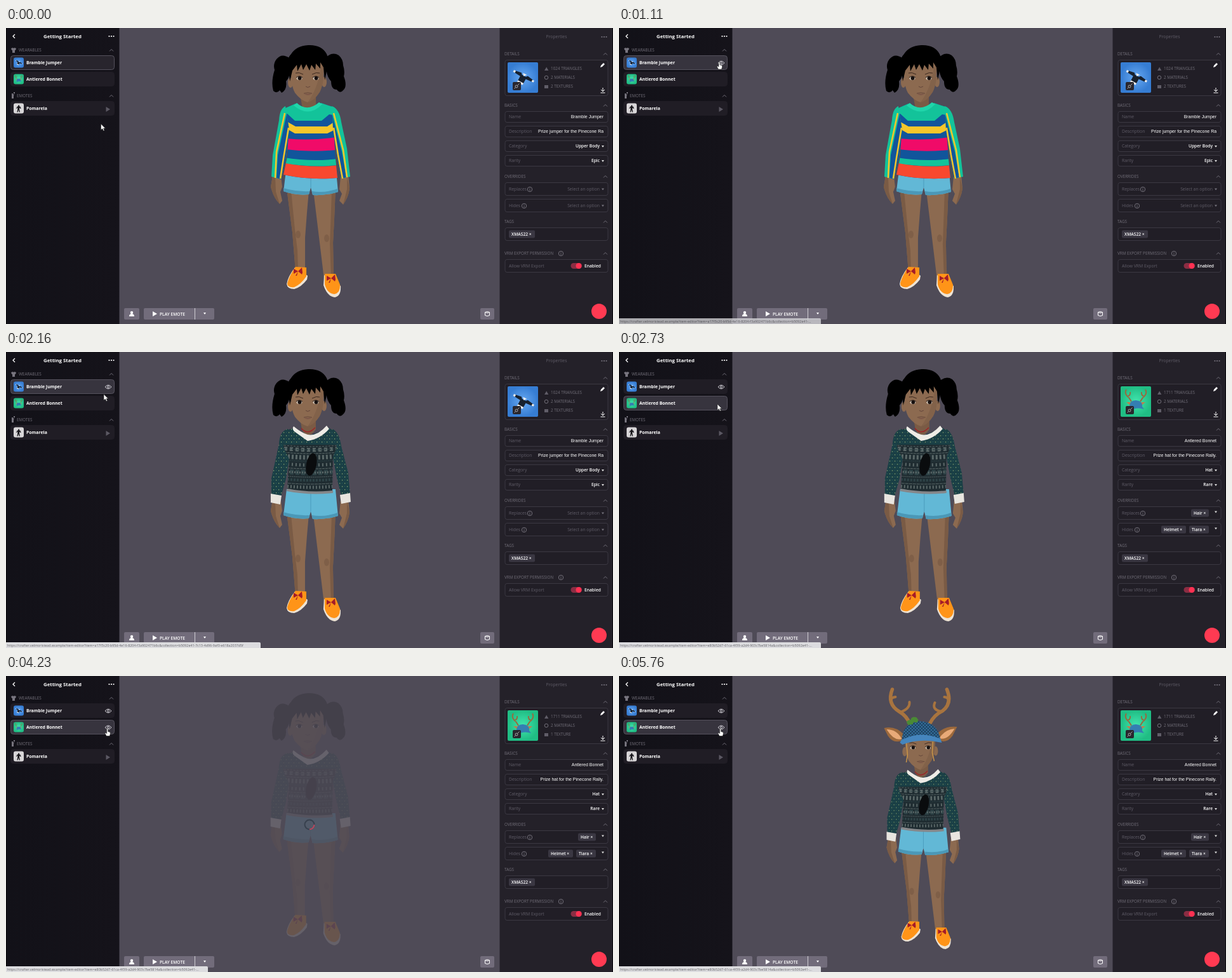
An HTML page that plays this animation: 956x466 px, repeating every 5.97 s.

```html
<!DOCTYPE html>
<html lang="en">
<head>
<meta charset="utf-8">
<title>Wearable editor</title>
<style>
html, body { margin: 0; width: 100%; height: 100%; overflow: hidden; background: #131119; }
svg { display: block; width: 956px; height: 466px; }
text { font: 6.8px "Open Sans", "Noto Sans", sans-serif; fill: #605d68; }
.bold { font-weight: 700; fill: #fff; font-size: 6.9px; }
.title { font-weight: 700; fill: #fff; font-size: 7.8px; }
.cap { font-size: 6.35px; fill: #716e78; }
.val { font: 7px "Liberation Sans", Arial, sans-serif; fill: #fff; }
.semi { font-weight: 600; fill: #fff; font-size: 6.7px; }
.url { font-size: 5.35px; fill: #65656a; }
.end { text-anchor: end; }
.mid { text-anchor: middle; }
.box { fill: #211e26; stroke: #3b3842; }
.chip { fill: #3a3742; }
.row { fill: #201d25; stroke: #201d25; }
.row.picked { fill: #28252d; stroke: #55525d; }
.row.lit { fill: #37343e; }
.line { fill: none; stroke: #716e78; stroke-width: 1; }
.skin { fill: #8c6a50; }
.shade { fill: #7a5b45; }
</style>
</head>
<body>
<svg viewBox="0 0 956 466">
  <defs>
    <linearGradient id="side" x2="1"><stop stop-color="#121118"/><stop offset="1" stop-color="#15131a"/></linearGradient>
    <radialGradient id="blue"><stop stop-color="#68a9f2"/><stop offset="1" stop-color="#367dd3"/></radialGradient>
    <radialGradient id="green"><stop stop-color="#42e5ae"/><stop offset="1" stop-color="#20bd84"/></radialGradient>
    <pattern id="dots" width="8" height="10" patternUnits="userSpaceOnUse">
      <path d="M0 0H8V10H0Z" fill="#1a3f45"/>
      <path d="M1 1h1.300v1.600h-1.300zM5 6h1.300v1.600h-1.300z" fill="#809c6c"/>
      <path d="M5 1h1v1h-1zM1 6h1v1h-1z" fill="#2f6566"/>
    </pattern>
    <pattern id="mesh" width="5" height="5" patternUnits="userSpaceOnUse">
      <path d="M0 0H5V5H0Z" fill="#3a7fae"/>
      <path d="M0 0L5 5M5 0L0 5" stroke="#1d3e5e" stroke-width="1.3"/>
    </pattern>
    <clipPath id="torso"><path d="M456 119Q474 142 496 118L517 125L522 148L516 162L519 206L522 236Q480 240 437 231L443 202L445 166L437 150L438 127Z"/></clipPath>
    <clipPath id="knit"><path d="M453 120Q474 142 506 118L519 126L521 150L515 166L514 219Q478 223 443 216L446 168L437 150L439 124Z"/></clipPath>
    <clipPath id="field"><path d="M836 154H941V173H836Z"/></clipPath>
  </defs>

  <path d="M0 0H956V466H0Z" fill="#4f4b57"/>
  <circle cx="478" cy="234" r="7.5" fill="none" stroke="#2c2933" stroke-width="2" class="load"/>
  <path d="M485.500 234A7.500 7.500 0 0 1 478 241.500" fill="none" stroke="#e2384f" stroke-width="2" class="load" id="arc"/>

  <g id="avatar">
    <g id="body">
      <!-- legs and shoes -->
      <path class="skin" d="M442 252L477 256L474 290L471 330L471 382L456 384L451 322ZM484 256L519 252L517 300L515 338L516 394L501 396L493 330Z"/>
      <path class="shade" d="M442 252L449 256L455 318L459 350L460 383L456 384L451 322ZM513 256L519 252L517 300L515 338L516 394L512 394L510 340Z"/>
      <g class="shade" opacity=".7"><ellipse cx="460" cy="325" rx="4" ry="6"/><ellipse cx="505" cy="331" rx="4" ry="6"/></g>
      <path d="M455 377Q444 391 442 403Q443 411 454 411Q465 408 474 396L475 390Z" fill="#eee4d5"/>
      <path d="M456 376L473 377L473 391Q464 404 454 408Q443 409 443 402Q446 390 456 376Z" fill="#ff9418"/>
      <path d="M501 389L500 405Q506 423 518 424Q528 422 527 406Z" fill="#eee4d5"/>
      <path d="M502 387L519 387L526 404Q527 417 517 419Q506 418 502 404Z" fill="#ff9418"/>
      <path id="bow" d="M460 383l-7 -4 0 8zl6 -6 1 8zl-4 7 2 0zl6 5 1 -3z" fill="#a51c28"/>
      <use href="#bow" x="52" y="11"/>
      <!-- hands, shorts -->
      <path class="skin" d="M420 232L417 250Q421 267 431 277L435 272L432 258L435 250L433 234ZM527 234L525 254L529 261L525 272L531 278Q540 265 541 252L539 232Z"/>
      <path class="shade" d="M420 234L417 250Q421 267 431 277L425 258L424 236ZM537 234L541 252Q540 265 531 278L537 254Z"/>
      <path d="M442 216L519 216L523 258Q505 264 483 263L480 251L477 262Q456 264 437 257Z" fill="#62b8d6"/>
      <path d="M437 252L437 257Q456 264 477 262L478 257Q457 258 437 252ZM482 257L483 263Q505 264 523 258L522 253Q503 260 482 257Z" fill="#4b98b7"/>
      <path d="M480 222V251" stroke="#4b9cbd" fill="none"/>
      <!-- head -->
      <path class="shade" d="M463 104L466 122Q475 140 488 122L488 102Z"/>
      <ellipse class="skin" cx="448" cy="86" rx="4" ry="8"/><ellipse class="skin" cx="501" cy="85" rx="4" ry="8"/>
      <path class="skin" d="M449 50H500Q502 86 494 101Q485 115 475 117Q464 114 455 102Q447 88 449 50Z"/>
      <path class="shade" d="M500 58Q502 86 494 101Q485 115 475 117Q491 96 496 62Z" opacity=".5"/>
      <g id="eye"><ellipse cx="462" cy="79" rx="4.500" ry="3" fill="#d9cbbb"/><circle cx="462.500" cy="79" r="3" fill="#17100f"/><path d="M457 78Q462 74 467 78" stroke="#17100f" fill="none"/></g>
      <use href="#eye" x="26"/>
      <path d="M456 71Q461 69 468 73M482 73Q489 69 494 71" stroke="#3a271e" fill="none"/>
      <path d="M472 92Q475 95 479 92M469 103Q475 101 482 103" stroke="#63453a" fill="none"/>
      <path d="M470 104Q475 107 481 104Z" fill="#775146"/>
      <g id="hair">
        <path d="M446 47Q434 39 426 49Q420 57 423 66Q417 85 421 99Q427 104 431 98L434 102Q443 97 441 84Q449 76 447 56ZM504 46Q514 37 524 43Q531 49 531 59Q534 68 532 76Q538 92 531 98Q526 104 521 97Q512 97 512 84Q504 76 504 58Z"/>
        <path d="M447 84L445 66Q440 50 449 41Q457 28 476 27Q497 26 505 41Q511 53 505 68L502 82L500 62L495 54V64L488 56L487 66L481 58L478 67L473 57L468 66L465 57L459 68L458 58L451 67Z"/>
      </g>
      <!-- striped top -->
      <g id="stripes">
        <g clip-path="url(#torso)">
          <path d="M430 110H530V240H430Z" fill="#11559b"/>
          <path d="M430 110H530V139L509 136L497 146H455L443 135L430 140Z" fill="#13c39a"/>
          <path d="M440 146L456 155H506L518 147V160L506 166H455L441 158Z" fill="#f6c62a"/>
          <path d="M442 174Q480 178 520 172V192Q480 196 440 191Z" fill="#f00b68"/>
          <path d="M438 204Q480 211 522 206V216Q480 220 437 213Z" fill="#13c39a"/>
          <path d="M434 212Q480 221 525 216V240H434Z" fill="#f8482f"/>
        </g>
        <path d="M440 123Q431 127 430 145L420 200L418 234L433 238L441 203L446 160Z" fill="#13c39a"/>
        <path d="M442 135L428 200L426 236L433 238L441 203L446 160Z" fill="#11559b"/>
        <path d="M439 134L426 195L424 236M445 157L437 205L432 237" stroke="#f6c62a" stroke-width="2.500" fill="none"/>
        <path d="M513 123Q525 127 528 148L537 190L542 234L528 237L521 200L515 158Z" fill="#13c39a"/>
        <path d="M514 137L529 195L536 235L528 237L521 200L515 158Z" fill="#11559b"/>
        <path d="M516 134L531 192L537 235M516 157L523 200L530 237" stroke="#f6c62a" stroke-width="2.500" fill="none"/>
        <path d="M458 118Q474 133 493 117L498 120Q477 142 453 122Z" fill="#20d5aa"/>
      </g>
      <!-- patterned jumper -->
      <g id="jumper">
        <path d="M444 121Q431 124 430 145L418 199L418 225L433 228L441 200L447 163ZM514 121Q525 126 528 148L539 190L542 224L528 226L521 198L514 161Z" fill="url(#dots)"/>
        <path d="M417 223L434 226L432 240L417 237ZM526 225L542 222L543 236L528 239Z" fill="#e8e5df"/>
        <g clip-path="url(#knit)">
          <path d="M430 110H530V230H430Z" fill="#1f2c31"/>
          <path d="M430 110H530V146H430Z" fill="url(#dots)"/>
          <g id="bands" fill="none"></g>
        </g>
        <ellipse cx="481" cy="177" rx="8" ry="18" transform="rotate(12 481 177)" fill="#0a0c0e"/>
        <path d="M443 215Q478 222 515 218L515 222Q478 226 442 219Z" fill="#85878a"/>
        <path d="M453 117Q450 121 454 125L475 140Q495 137 509 121L505 116Q490 133 475 130Q465 127 453 117Z" fill="#eeece6"/>
        <path d="M465 120Q475 132 487 119" stroke="#9d2428" stroke-width="1.500" fill="none"/>
      </g>
    </g>
    <g id="helmet">
      <g fill="none" stroke="#a8743f" stroke-linecap="round">
        <path d="M459 76Q454 63 442 56Q422 44 431 21" stroke-width="5.500"/>
        <path d="M443 57Q459 52 458 41M430 43Q426 34 436 33" stroke-width="4"/>
        <path d="M490 75Q497 61 510 55Q526 43 517 21" stroke-width="5.500"/>
        <path d="M508 56Q493 53 498 42M518 43Q522 34 513 33" stroke-width="4"/>
      </g>
      <path d="M448 101Q433 108 424 94L418 82Q436 78 449 92ZM502 100Q516 108 526 94L533 80Q513 78 502 91Z" fill="#9c693c"/>
      <path d="M446 99Q434 103 422 84Q438 84 446 99ZM505 98Q518 102 529 83Q514 84 505 98Z" fill="#e8aa78"/>
      <path d="M453 103L455 124L453 136M495 103L494 121L497 134" stroke="#c99549" stroke-width="1.500" fill="none"/>
      <path d="M446 101Q447 74 473 71Q503 72 507 101Z" fill="url(#mesh)"/>
      <path d="M445 101Q475 85 507 99L509 105Q475 97 447 108L443 105Z" fill="#4585bd"/>
      <path d="M456 77Q450 70 460 69Q461 63 469 65L472 69Q470 76 465 72L463 76Z" fill="#4a8a35"/>
    </g>
  </g>

  <path d="M0 0H178.500V466H0Z" fill="url(#side)"/>
  <path d="M777.500 0H955V466H777.500Z" fill="#242129"/>
  <path d="M0 0H1V466H0ZM955 0H956V466H955Z" fill="#08070a"/>
  <g id="ui"></g>

  <g id="status">
    <path id="bar" fill="#dcdcdf"/>
    <text id="link" class="url" x="2" y="464.300"></text>
  </g>
  <path id="arrow" d="M0 0V9.500L2.300 7.500L4 11L5.600 10.200L4 7H7Z" fill="#fff" stroke="#222" stroke-width=".6"/>
  <path id="hand" d="M-1 1Q0 -.5 1 1V5L4.500 6V9L3.500 12H-1.500L-4 7.500L-2.500 7L-1 8Z" fill="#fff" stroke="#222" stroke-width=".6"/>
</svg>
<script>
const LOOP = 5970, STEP = 30;
const $ = id => document.getElementById(id);
const text = (x, y, s, c = '') => `<text x="${x}" y="${y}" class="${c}">${s}</text>`;
const rect = (x, y, w, h, r, a) => `<rect x="${x}" y="${y}" width="${w}" height="${h}" rx="${r}" ${a}/>`;
const path = (d, a) => `<path d="${d}" ${a}/>`;
const fill = c => `fill="${c}"`;
const line = 'class="line"';
const up = (x, y) => path(`M${x - 3} ${y + 1.5}l3 -3 3 3`, line);
const down = (x, y, c = '#ddd') => path(`M${x - 2} ${y - 1}h4l-2 3z`, fill(c));
const more = (x, y, c) => [-3.5, 0, 3.5].map(d => `<circle cx="${x + d}" cy="${y}" r="1.1" ${fill(c)}/>`).join('');
const info = (x, y) => `<circle cx="${x}" cy="${y}" r="3.7" ${line}/>` + path(`M${x} ${y - 2}v1m0 .8v2.400`, line);
const chip = (x, y, w, s) => rect(x, y, w, 12, 2, 'class="chip"') + text(x + 4, y + 8.4, s + ' ×', 'semi');
const eye = (id, y) => `<g id="${id}" fill="none" stroke="#cbc9d0">${path(`M156 ${y}q5 -6 10 0q-5 6 -10 0z`, '')}<circle cx="161" cy="${y}" r="1.6"/></g>`;

// Tiny item pictures, drawn in a 48 unit square
const shirtArt = `<g transform="rotate(28 24 24) translate(4.500 3.500) scale(.82)">${path('M5 20L17 18L20 21H28L31 18L43 20V24L30 25V36H18V25L5 24Z', fill('#17202d'))}${path('M2 20h4v4h-4zM42 20h4v4h-4zM18 34h12v4h-12zM20 17l4 5 4 -5z', fill('#eee'))}</g>`;
const hatArt = path('M17 24Q14 18 10 15Q6 10 9 5M11 16Q16 14 15 9M31 24Q34 18 38 15Q42 10 39 5M37 16Q32 14 33 9', 'fill="none" stroke="#98693f" stroke-width="2"') +
  path('M9 25L16 25 15 30ZM39 25L32 25 33 30Z', fill('#bd804c')) + path('M14 32Q14 22 24 22Q35 23 34 32L37 36Q26 32 14 38Z', fill('#347eb2'));
const poseArt = path('M22 9h5v6h4l4 9 -3 2 -4 -6 -1 8 3 14h-4l-3 -11 -3 11h-4l3 -15 -1 -8 -4 7 -2 -2 5 -9h4z', fill('#17151a'));
const art = (x, y, size, bg, a) => `<g transform="translate(${x} ${y}) scale(${size / 48})">${rect(0, 0, 48, 48, size > 20 ? 2 : 9, fill(bg))}${a}</g>`;

const row = (id, y, name, bg, a) => rect(7.5, y + .5, 163, 22, 4, `id="${id}" class="row"`) + art(12, y + 3.5, 16, bg, a) + text(32, y + 13.8, name, 'bold');

const head = (y, s) => text(785, y + 2.2, s, 'cap') + up(944, y);
const field = (y, h, s) => rect(786, y + .5, 162, h - 1, 3, 'class="box"') + text(792, y + h / 2 + 2.4, s);

const left = path('M14 10l-3 3 3 3', 'fill="none" stroke="#fff" stroke-width="1.3"') +
  text(89, 15.8, 'Getting Started', 'title mid') + more(166, 13, '#fff') +
  path('M8 32l3 -1q1 2 2 0l3 1 -1 3h-1v4h-4v-4h-1z', fill('#77747e')) + text(20, 37.3, 'WEARABLES', 'cap') + up(166, 35) +
  row('row1', 43, 'Bramble Jumper', 'url(#blue)', shirtArt) + row('row2', 69, 'Antlered Bonnet', 'url(#green)', hatArt) +
  path('M9 103h2v2l2 -2 -1 4v4h-3zM12 101h2v2h-2z', fill('#77747e')) + text(17, 108.7, 'EMOTES', 'cap') + up(166, 107) +
  row('row3', 115, 'Pomarela', '#d8d6d8', poseArt) + path('M157.5 124V132L164 128Z', fill('#5b5863')) + eye('eye1', 55) + eye('eye2', 81);

const right = text(867, 16.4, 'Properties', 'mid') + more(942, 14, '#77747e') +
  head(41, 'DETAILS') + rect(786, 50.5, 162, 56, 3, 'class="box"') +
  path('M848 67l3.200 -5.500 3.200 5.500zM848 90h6v5h-6z', fill('#605d68')) + `<circle cx="851" cy="78" r="2.800" ${line}/>` +
  path('M936 62l1 -3 4 -4 2 2 -4 4z', fill('#fff')) + path('M940 94v6m-3 -3l3 3 3 -3M936.500 102h7', 'fill="none" stroke="#fff"') +
  head(122, 'BASICS') + field(131, 18, 'Name') + field(154, 18, 'Description') + field(177, 18, 'Category') + field(200, 18, 'Rarity') +
  down(940, 186) + down(940, 209) +
  head(234, 'OVERRIDES') + field(243, 21, 'Replaces') + info(825, 254) + field(269, 21, 'Hides') + info(816, 280) +
  head(305, 'TAGS') + field(314, 21, '') + chip(792, 318.5, 41, 'XMAS22') +
  head(355, 'VRM EXPORT PERMISSION') + info(874, 355) + field(364, 21, 'Allow VRM Export') +
  rect(889.5, 370, 17.500, 9, 4.5, fill('#8b2d43')) + `<circle cx="902" cy="374.500" r="4.500" ${fill('#ff3152')}/>` + text(911, 377, 'Enabled', 'semi');

const badge = rect(798, 85, 13, 13, 2, fill('#29262d')) + '<circle cx="804" cy="92" r="2" fill="none" stroke="#aaa"/>' + path('M805.500 90.500l3 -3M802.500 93.500l-2 2', 'stroke="#aaa"');
const stats = list => list.map((s, i) => text(858, 66.3 + 14 * i, s, 'cap')).join('');
const props = (id, pic, counts, name, about, cat, rarity, extra) => `<g id="${id}">${pic}${badge}${stats(counts)}` +
  text(941, 142.4, name, 'val end') + about + text(935, 188.4, cat, 'semi end') + text(935, 211.4, rarity, 'semi end') + extra + '</g>';

const select = y => text(935, y + 2.4, 'Select an option', 'end') + down(940, y, '#77747e');
const first = props('props1', art(790, 54, 48, 'url(#blue)', shirtArt), ['1024 TRIANGLES', '2 MATERIALS', '2 TEXTURES'], 'Bramble Jumper',
  `<g clip-path="url(#field)">${text(838, 165.4, 'Prize jumper for the Pinecone Rally.', 'val')}</g>`, 'Upper Body', 'Epic', select(253.5) + select(279.5));
const second = props('props2', art(790, 54, 48, 'url(#green)', hatArt), ['1711 TRIANGLES', '2 MATERIALS', '1 TEXTURE'], 'Antlered Bonnet',
  text(941, 165.4, 'Prize hat for the Pinecone Rally.', 'val end'), 'Hat', 'Rare',
  chip(901, 247.5, 28, 'Hair') + down(940, 251.5) + chip(854, 273.5, 39, 'Helmet') + chip(898, 273.5, 31, 'Tiara') + down(940, 277.5));

const key = fill('#726c7b');
const bottom = rect(186, 441, 24, 18, 2, key) + rect(217, 441, 111, 18, 2, key) + rect(747, 441, 22, 18, 2, key) +
  path('M297.500 441v18', 'stroke="#d0cdd4"') + path('M231 446v8l7 -4z', fill('#fff')) + text(242, 452.7, 'PLAY EMOTE', 'semi') + down(313, 449, '#fff') +
  '<circle cx="198" cy="448" r="2.200" fill="#fff"/>' + path('M194 454q0 -4 4 -4t4 4z', fill('#fff')) +
  path('M754.500 447.500q3.500 -2 7 0v5q-3.500 2 -7 0zq3.500 2 7 0', 'fill="none" stroke="#fff"') +
  `<circle cx="934" cy="446" r="12" ${fill('#ff3a52')}/>`;

$('ui').innerHTML = left + right + first + second + bottom;

// Knitted rows: height, thickness, dash, gap
$('bands').innerHTML = [[147, 1, 3, 2], [152, 6, 5, 4], [152, 2, 2, 2], [158, 1, 4, 1], [164, 7, 3, 3], [170, 1, 2, 1], [176, 5, 2, 4], [182, 1, 4, 1], [188, 8, 6, 3], [188, 3, 2, 2], [195, 1, 2, 1], [200, 4, 3, 2], [206, 1, 5, 1], [211, 5, 2, 3]]
  .map(([y, w, on, off], i) => path(`M438 ${y}Q480 ${y + 4} 522 ${y}`, `stroke="${i % 3 == 2 ? '#2e4347' : '#5b6868'}" stroke-width="${w}" stroke-dasharray="${on} ${off}"`)).join('');

const site = 'https://crafter.velmoristead.example/item-editor?item=';
const links = [
  site + 'a17f3c20-b95d-4e16-8204-f3a902471b6c&amp;collection=b5092e41-...',
  site + 'a17f3c20-b95d-4e16-8204-f3a902471b6c&amp;collection=b5092e41-7c13-4d96-9af0-e618a2037d5f',
  site + 'e80b52d7-61ca-4f39-a2d4-903c7be5814a&amp;collection=b5092e41-...'
];

const show = (el, on) => { el.style.display = on ? '' : 'none'; };
const ramp = (t, a, b) => Math.min(1, Math.max(0, (t - a) / (b - a)));
const ease = u => u * u * (3 - 2 * u);

// Pointer stops: time, x, y
const stops = [[0, 149.5, 151], [300, 149.5, 151], [990, 158, 53], [1560, 158, 53], [2160, 154, 66.5], [2520, 155, 82], [3000, 155, 82], [3420, 159.7, 82.5], [LOOP, 159.7, 82.5]];
function pointer(t) {
  const i = stops.findIndex(s => s[0] > t);
  const [t0, x0, y0] = stops[i - 1], [t1, x1, y1] = stops[i];
  const u = ease(ramp(t, t0, t1));
  return [x0 + (x1 - x0) * u, y0 + (y1 - y0) * u];
}

let shownLink = -1;
function setLink(n) {
  if (n === shownLink) return;
  shownLink = n;
  $('link').innerHTML = links[n];
  const w = n === 1 ? 401 : 318;
  $('bar').setAttribute('d', `M0 457H${w - 2}Q${w} 457 ${w} 459V466H0Z`);
}

function draw(t) {
  const [x, y] = pointer(t);
  const onHand = x > 156.5;
  const dressed = t >= 1530, hatted = t >= 4620, swapped = t >= 2580;

  for (const id of ['arrow', 'hand']) $(id).setAttribute('transform', `translate(${x} ${y})`);
  show($('hand'), onHand);
  show($('arrow'), !onHand);

  const over = top => y >= top && y < top + 24;
  const mark = (id, picked, lit) => $(id).setAttribute('class', 'row' + (picked ? ' picked' : '') + (lit ? ' lit' : ''));
  mark('row1', !swapped, over(43));
  mark('row2', swapped, over(69));
  mark('row3', false, over(115));
  show($('eye1'), t >= 1020);
  show($('eye2'), t >= 4020);
  show($('props1'), !swapped);
  show($('props2'), swapped);

  setLink(t < 1650 ? 0 : swapped ? 2 : 1);
  $('status').style.opacity = ramp(t, 1020, 1140);

  const faded = (a, b) => ramp(t, a, a + 210) * (1 - ramp(t, b, b + 180));
  const cover = Math.max(faded(1140, 1650), faded(4050, 4800));
  $('avatar').style.opacity = 1 - cover;
  document.querySelectorAll('.load').forEach(el => { el.style.opacity = cover; });
  $('arc').setAttribute('transform', `rotate(${(t - 4230) * .6} 478 234)`);

  const sway = .8 * Math.cos((t - 2730) / 2200 * 2 * Math.PI);
  $('avatar').setAttribute('transform', `translate(${sway} 0)`);
  $('body').setAttribute('transform', hatted ? 'translate(38.4 40) scale(.92)' : '');
  show($('stripes'), !dressed);
  show($('jumper'), dressed);
  show($('hair'), !hatted);
  show($('helmet'), hatted);
}

function tick() {
  const t = performance.now() % LOOP;
  draw(Math.min(5760, Math.floor(t / STEP) * STEP));
  requestAnimationFrame(tick);
}
tick();
</script>
</body>
</html>
```
